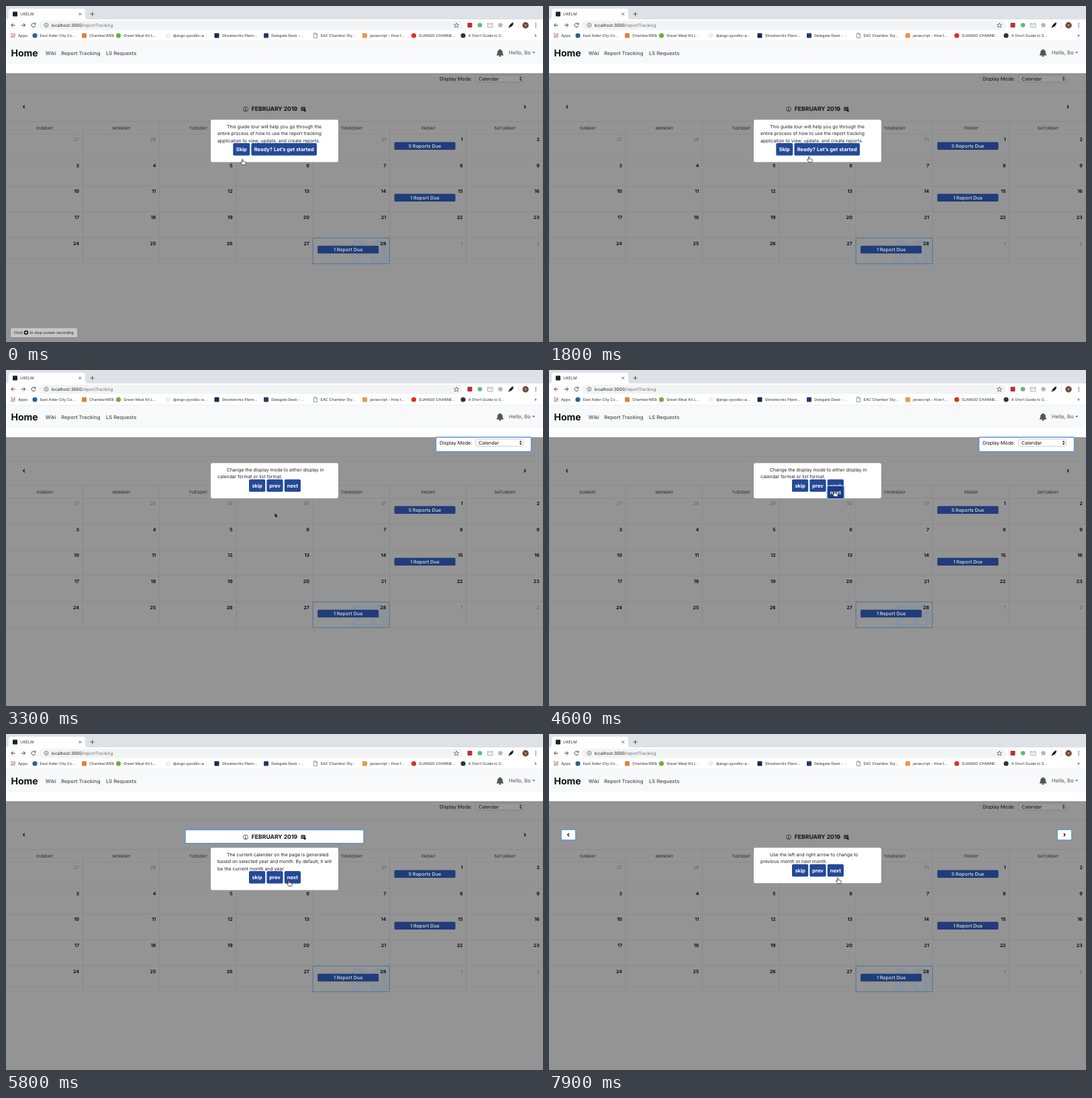
Animation, 800 px wide and 500 px high, one loop 8 s. Source, as an HTML page:

```html
<!DOCTYPE html>
<html lang="en">
<head>
<meta charset="utf-8">
<title>Report tracking tour</title>
<style>
  html, body { margin: 0; width: 100%; height: 100%; overflow: hidden; background: #fff; }
  svg { display: block; width: 800px; height: 500px; }
  text { font-family: Inter, Roboto, sans-serif; text-rendering: geometricPrecision; white-space: pre; }
</style>
</head>
<body>
<svg id="stage" viewBox="0 0 800 500" xmlns="http://www.w3.org/2000/svg"></svg>
<script>
const LOOP = 8000;
const BLUE = '#234a97', DIM_BLUE = '#1f3d7a', DIM = '#949494', GRID = '#898989', GLOW = '#5d93d6';

const rect = (x, y, w, h, fill, extra = '') =>
  `<rect x="${x}" y="${y}" width="${w}" height="${h}" fill="${fill}" ${extra}/>`;
const circle = (x, y, r, fill, extra = '') =>
  `<circle cx="${x}" cy="${y}" r="${r}" fill="${fill}" ${extra}/>`;
const path = (d, stroke, width = 1, fill = 'none', extra = '') =>
  `<path d="${d}" stroke="${stroke}" stroke-width="${width}" fill="${fill}" ${extra}/>`;
const text = (x, y, s, size, fill = '#111', weight = 400, anchor = 'start') =>
  `<text x="${x}" y="${y}" font-size="${size}" fill="${fill}" font-weight="${weight}" text-anchor="${anchor}">${s}</text>`;
const group = (id, body) => `<g id="${id}">${body}</g>`;

function browser() {
  const ink = '#4a4d51';
  let s = rect(0, 0, 800, 20, '#dee1e6') + rect(0, 20, 800, 32, '#fff');
  s += path('M1 20Q4 20 4 16V8Q4 4 8 4H114Q118 4 118 8V16Q118 20 121 20Z', 'none', 0, '#fff');
  s += rect(10, 8.5, 7, 7, '#20232a', 'rx="1"');
  s += text(21, 14.2, 'UKELM', 5.9, '#333');
  s += path('M108.5 10.2l3.6 3.6m0-3.6l-3.6 3.6M125.6 12h6m-3-3v6', ink, .9);

  s += path('M13.5 28.5H7.8m2.8-2.9l-2.9 2.9l2.9 2.9', ink, 1);
  s += path('M23 28.5h5.7m-2.8-2.9l2.9 2.9l-2.9 2.9', ink, 1);
  s += path('M43.4 26.6A3 3 0 1 0 44 29.3M43.9 25v2.3h-2.3', ink, 1);
  s += rect(49, 22, 632, 13.5, '#f1f3f4', 'rx="6.7"');
  s += circle(60, 28.5, 2.9, 'none', `stroke="${ink}" stroke-width=".7"`);
  s += path('M60 28v2.1M60 26.6v.8', ink, .8);
  s += text(67.5, 30.8, 'localhost:3000<tspan fill="#6b6f74">/reportTracking</tspan>', 6.4, '#202124');
  s += path('M671 25.2l1 2.4 2.6.2-2 1.7.7 2.5-2.3-1.4-2.3 1.4.7-2.5-2-1.7 2.6-.2Z', ink, .7);

  s += rect(687.5, 25, 7, 7, '#b9322c', 'rx="1"');
  s += circle(706, 28.5, 3.3, '#5cb984');
  s += rect(717.5, 26, 7.5, 5.5, '#fff', 'stroke="#9a9da1" stroke-width=".8"');
  s += path('M717.5 26l3.7 3 3.8-3', '#9a9da1', .7);
  s += circle(736.5, 28.5, 3.3, '#b5b8bc');
  s += path('M749 32.5q1-5.5 6.5-7.8q.4 5.4-5 6.5Z', '#222', .7, '#222');
  s += path('M763.5 23.5v10', '#d5d7da', .7);
  s += circle(774, 28.8, 4.7, '#70483c') + text(774, 30.8, 'Y', 5.4, '#fff', 400, 'middle');
  for (const y of [26, 28.6, 31.2]) s += circle(789.3, y, .8, ink);

  const dots = ['#d84b3f', '#e0ad2f', '#4a86dc'];
  for (let i = 0; i < 9; i++)
    s += rect(7.4 + (i % 3) * 2.3, 40.8 + (i / 3 | 0) * 2.3, 1.6, 1.6, dots[(i + (i / 3 | 0)) % 3]);
  s += text(18, 46, 'Apps', 5.7, '#333');

  const marks = [
    [43, 'East Alder City Co...', '#276292', 1], [116.5, 'ChamberWEB', '#e0803a', 0],
    [167.5, 'Green Meal Kit L...', '#6dae42', 1], [241, 'django-pyodbc-a...', '#f0eeee', 1],
    [314, 'Streetworks Plann...', '#172b4d', 0], [387.5, 'Delegate Desk - ...', '#21396e', 0],
    [461, 'EAC Chamber Sty...', '', 2], [534.5, 'javascript - How t...', '#e9984b', 0],
    [607.5, 'DJANGO CHANNE...', '#e32b22', 1], [681, 'A Short Guide to S...', '#333', 1]
  ];
  for (const [x, label, color, kind] of marks) {
    if (kind === 2) s += path(`M${x - 2.4} 40.4h3l2 2v5h-5ZM${x + .6} 40.4v2h2`, '#666', .7);
    else s += kind ? circle(x, 44, 3.6, color) : rect(x - 3.5, 40.5, 7, 7, color, 'rx="1"');
    s += text(x + 7.7, 46, label, 5.6, '#333');
  }
  return s + text(789, 45.6, '»', 6.5, '#333', 400, 'middle');
}

function navbar() {
  let s = rect(0, 52, 800, 34, '#f8f9fa') + rect(0, 86, 800, 14, '#fff');
  s += path('M0 52.2H800', '#e3e5e8', .6);
  s += text(7.5, 75.2, 'Home', 14, '#111', 700);
  s += text(58.8, 72.6, 'Wiki', 7.6, '#5f6062', 600);
  s += text(82.3, 72.6, 'Report Tracking', 7.55, '#5f6062', 600);
  s += text(149, 72.6, 'LS Requests', 7.6, '#5f6062', 600);
  s += path('M736 64.2v1M731 73h10c-1.6-1.5-1.5-2.6-1.6-4.4c-.1-2-1.5-3.4-3.4-3.4s-3.3 1.4-3.4 3.4c-.1 1.8 0 2.9-1.6 4.4Z', '#555', 1, '#555');
  s += circle(736, 74.3, 1.4, '#555');
  s += text(749, 72.2, 'Hello, Bo', 7.7, '#66686b', 500);
  return s + path('M783.8 68.2h4.6l-2.3 2.4Z', 'none', 0, '#66686b');
}

function modePicker(lit) {
  const bg = lit ? '#fff' : DIM;
  let s = lit ? rect(640.5, 100, 142, 21.5, bg, `rx="1.5" stroke="${GLOW}" stroke-width="1.4"`) : '';
  s += text(646, 110.8, 'Display Mode:', 7.2);
  s += rect(699.5, 103, 71, 10.4, lit ? '#fff' : '#999', `rx="1.6" stroke="${lit ? '#bbb' : '#777'}" stroke-width=".7"`);
  s += text(704, 110.8, 'Calendar', 7.1);
  return s + path('M764.8 107.4l1.9-2.5 1.9 2.5ZM764.8 109.1l1.9 2.5 1.9-2.5Z', 'none', 0, '#222');
}

function monthTitle(lit) {
  let s = lit ? rect(267, 142.5, 266, 20.3, '#fff', `rx="1.5" stroke="${GLOW}" stroke-width="1.4"`) : '';
  s += circle(357, 153.5, 3.5, 'none', 'stroke="#222" stroke-width=".7"');
  s += path('M357 152.8v2.7M357 151v.9M356.1 155.5h1.8M356.3 152.9h.7', '#222', .8);
  s += text(400, 156, 'FEBRUARY 2019', 8.6, '#111', 700, 'middle');
  s += rect(439.4, 150.2, 6.6, 5.8, '#222', 'rx=".8"');
  s += path('M440 152h5.4M440.3 153.4h4M440.3 154.8h3', lit ? '#fff' : DIM, .5);
  return s + circle(445.3, 155.7, 1.6, '#222');
}

const chevron = (x, dir) => path(`M${x + dir} 147.8l${-2 * dir} 2.2l${2 * dir} 2.2`, '#111', 1.3);

function litArrows() {
  const box = x => rect(x, 142.3, 21.5, 15.5, '#fff', `rx="1.8" stroke="${GLOW}" stroke-width="1.2"`);
  return box(18.2) + box(757.2) + chevron(28.8, 1) + chevron(767.8, -1);
}

function calendar() {
  const col = 800 / 7, top = 190.6, row = 38.6;
  let s = rect(0, 100, 800, 400, DIM);
  s += path('M0 128.4H800M0 171.8H800', GRID, .8);
  for (let r = 0; r <= 5; r++) s += path(`M0 ${top + r * row}H800`, GRID, .8);
  for (let c = 0; c <= 7; c++)
    s += path(`M${Math.min(799.6, Math.max(.4, c * col))} ${c % 7 ? 171.8 : 128.4}V${top + 5 * row}`, GRID, .8);

  'SUNDAY MONDAY TUESDAY WEDNESDAY THURSDAY FRIDAY SATURDAY'.split(' ')
    .forEach((d, i) => s += text((i + .5) * col + .6, 184.1, d, 6, '#333', 500, 'middle'));

  s += `<clipPath id="cell">${rect(457, 345, 114.3, 38.6, '#000')}</clipPath>`;
  s += `<g clip-path="url(#cell)">${text(571, 384, '28', 48, '#87929f', 700, 'end')}</g>`;
  s += rect(457.2, 345.2, 114, 38.3, 'none', 'stroke="#54789f" stroke-width="1.1"');

  for (let i = 0; i < 35; i++) {
    const n = i - 4, out = n < 1 || n > 28;
    const label = n < 1 ? 31 + n : n > 28 ? n - 28 : n;
    s += text((i % 7 + 1) * col - 5.2, 201.2 + (i / 7 | 0) * row, label, 7, out ? '#6a6a6a' : '#111', out ? 500 : 700, 'end');
  }
  for (const [x, y, label] of [[578.5, 202.5, '5 Reports Due'], [578.5, 279.6, '1 Report Due'], [464.2, 356.8, '1 Report Due']])
    s += rect(x, y, 91, 11.5, DIM_BLUE, 'rx="1.5"') + text(x + 45.5, y + 8.5, label, 7.15, '#c9c9c9', 600, 'middle');
  return s + chevron(26.8, 1) + chevron(773, -1);
}

function toast() {
  return rect(6.4, 478.8, 100.4, 14.8, '#c6c6c6', 'rx="3" stroke="#7c7c7c" stroke-width=".7"') +
    text(12, 488.2, 'Click', 5.6, '#222') + circle(30, 486, 3.3, '#222') +
    rect(28.8, 484.8, 2.4, 2.4, '#ddd') + text(35.5, 488.2, 'to stop screen recording', 5.65, '#222');
}

const button = (x, y, w, label) =>
  rect(x, y, w, 18.5, BLUE, 'rx="1.8"') + text(x + w / 2, y + 12, label, 7.55, '#fff', 650, 'middle');

function dialog(y, lines, intro) {
  const h = 31.8 + lines.length * 10.4, by = y + h - 28.2;
  let s = rect(305, y, 190, h, '#fff', 'rx="2.4"');
  lines.forEach((l, i) => s += text(i ? 315 : 329, y + 12.4 + i * 10.4, l, 6.9, '#222'));
  if (intro) return s + button(338.3, by, 25, 'Skip') + button(365.4, by, 97.6, 'Ready? Let’s get started');
  return s + ['skip', 'prev', 'next'].map((b, i) => button(362 + i * 26.4, by, 24.2, b)).join('');
}

const focusRing = y =>
  rect(414.8, y, 24.2, 18.5, '#1d3c7c', 'rx="1.8"') + text(426.9, y + 12, 'next', 7.55, '#fff', 650, 'middle') +
  rect(414.3, y - .5, 25.4, 19.5, 'none', 'rx="2.4" stroke="#8fb2ea" stroke-width="1.5"');

const hand = path('M-1.6 1V-3.1q0-.9.8-.9t.8.9V-.7q1.5-.5 1.7.3q1.4-.3 1.5.6q1.2 0 1.2 1q0 1.9-1 3.2H-1.2Q-2 2.8-3.3 1.4q-.6-1 .4-1.1q.6 0 1.3.7Z', '#111', .7, '#fff');
const arrow = path('M-1 -3V3.4l1.5-1.3 1 2.2 1.1-.5-.9-2.1h2Z', '#fff', .6, '#111', 'paint-order="stroke"');

const steps = [
  { at: 0, body: dialog(169.3, ['This guide tour will help you go through the', 'entire process of how to use the report tracking', 'application to view, update, and create reports.'], true) },
  { at: 1900, body: modePicker(true) + dialog(138.4, ['Change the display mode to either display in', 'calendar format or list format.']) },
  { at: 4700, body: monthTitle(true) + dialog(169.3, ['The current calender on the page is generated', 'based on selected year and month. By default, it will', 'be the current month and year.']) },
  { at: 6500, body: litArrows() + dialog(169.3, ['Use the left and right arrow to change to', 'previous month or next month.']) }
];

// Arrows sit on a plain patch so the lit version hides the dim one.
document.getElementById('stage').innerHTML =
  calendar() + modePicker(false) + monthTitle(false) + browser() + navbar() +
  steps.map((s, i) => group('step' + i, s.body)).join('') +
  group('press1', focusRing(172.8)) + group('press2', focusRing(214.1)) +
  group('toast', toast()) +
  group('cursor', group('hand', hand) + group('arrow', arrow));

const el = id => document.getElementById(id);
const show = (id, on) => { el(id).style.display = on ? '' : 'none'; };

// time, x, y
const track = [
  [0, 353, 232], [500, 353, 232], [1300, 388, 228], [2900, 388, 228],
  [3600, 410, 208], [4300, 426, 184], [5450, 426, 184], [5800, 422, 222],
  [6300, 422, 222], [6700, 428, 226], [7300, 428, 226], [7800, 431, 218], [LOOP, 431, 218]
];

function cursorAt(t) {
  const i = track.findIndex(k => k[0] > t);
  const [t0, x0, y0] = track[i - 1], [t1, x1, y1] = track[i];
  const u = (t - t0) / (t1 - t0), e = u * u * (3 - 2 * u);
  return [x0 + (x1 - x0) * e, y0 + (y1 - y0) * e];
}

function draw(now) {
  const t = now % LOOP;
  steps.forEach((s, i) => show('step' + i, t >= s.at && t < (steps[i + 1]?.at ?? LOOP)));
  show('press1', t >= 4600 && t < 4700);
  show('press2', t >= 6400 && t < 6500);
  show('toast', t < 1600);
  const [x, y] = cursorAt(t);
  el('cursor').setAttribute('transform', `translate(${x.toFixed(2)} ${y.toFixed(2)})`);
  const plain = (t >= 1900 && t < 4100) || (t >= 4700 && t < 5700);
  show('hand', !plain);
  show('arrow', plain);
}

function tick() {
  draw(performance.now());
  requestAnimationFrame(tick);
}
tick();
</script>
</body>
</html>
```
